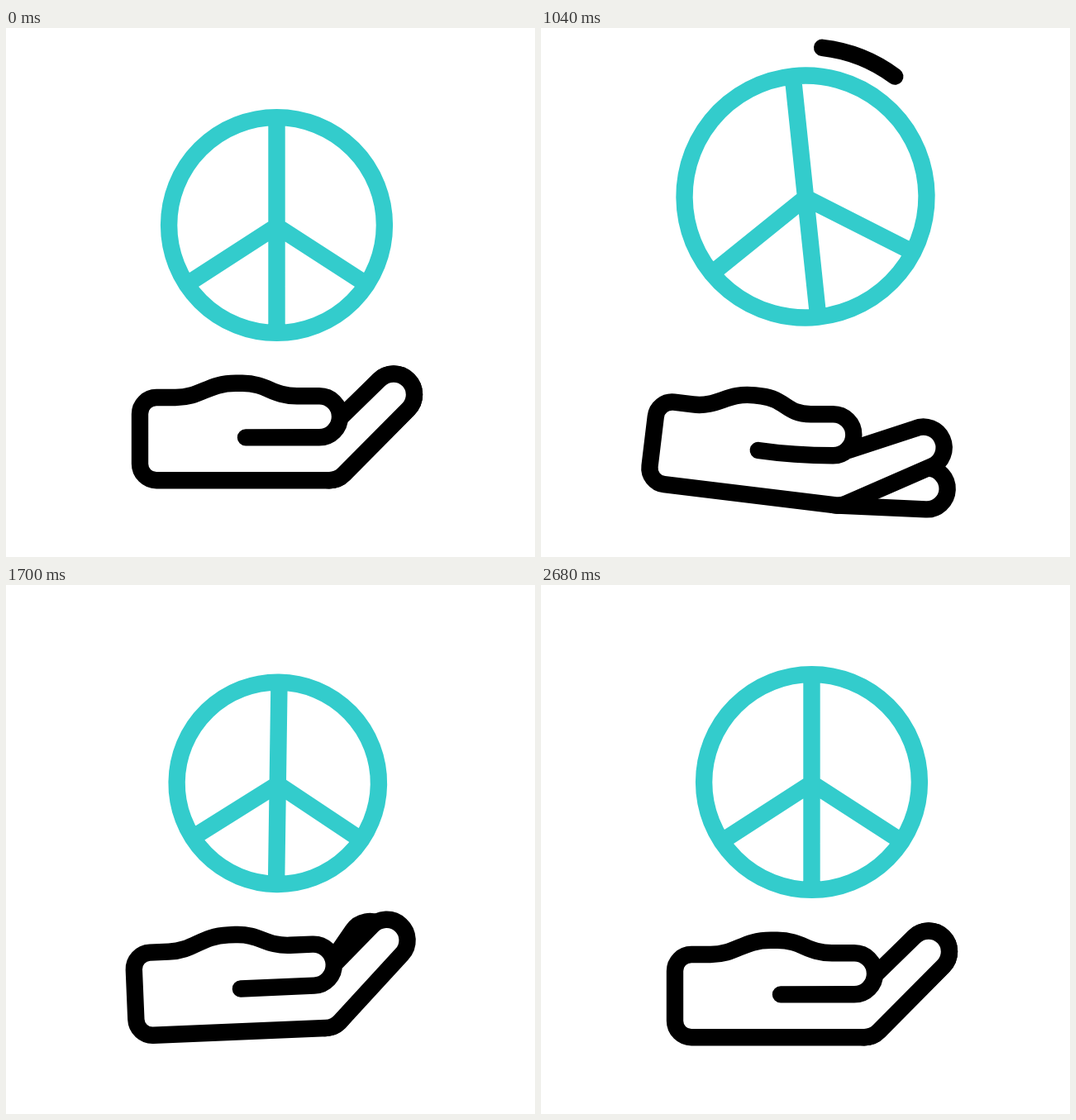
Animation, 640 px wide and 640 px high, one loop 2800 ms. Source, as an HTML page with a canvas:

```html
<!DOCTYPE html>
<html lang="en">
<head>
<meta charset="utf-8">
<title>Peace in hand</title>
<style>
html, body { margin: 0; width: 100%; height: 100%; overflow: hidden; background: #fff; }
canvas { display: block; }
</style>
</head>
<body>
<canvas id="stage" width="640" height="640"></canvas>
<script>
const ctx = document.getElementById('stage').getContext('2d');
const LOOP = 2800, LINE = 20.4, RAD = Math.PI / 180, QUARTER = Math.PI / 2;

const ramp = (t, from, to) => Math.min(1, Math.max(0, (t - from) / (to - from)));
const ease = (t, from, to) => {
  const u = ramp(t, from, to);
  return u * u * (3 - 2 * u);
};
// Swift rise to a level, then a slow drift to 1
const climb = (t, level) => level * ease(t, 60, 540) + (1 - level) * ramp(t, 540, 1040);

// Wrist: x, y, tilt. Fingertips: offset from the knuckle.
const wrist = { rest: [182, 547.2, 0], raised: [149, 552.2, 6.9], curled: [186, 542.7, -4.9],
  level: 0.94, curledAt: 1980, settledAt: 2510 };
const frontFinger = { rest: [78, -78.7], raised: [97, -57], curled: [78, -78],
  level: 0.94, curledAt: 1700, settledAt: 2680 };
const backFinger = { rest: [78, -78.7], raised: [107, -8], curled: [44, -95],
  level: 0.85, curledAt: 1980, settledAt: 2680 };

function poseAt(t, part) {
  const back = ease(t, 1040, part.curledAt);
  const raised = climb(t, part.level) * (1 - back);
  const curled = back - ease(t, part.curledAt, part.settledAt);
  return part.rest.map((value, i) =>
    value + raised * (part.raised[i] - value) + curled * (part.curled[i] - value));
}

function ballAt(t) {
  const fall = ease(t, 1080, 1440);
  const lift = level => climb(t, level) * (1 - fall);
  const squeeze = fall - ease(t, 1440, 2500);
  const puff = ease(t, 1980, 2250) - ease(t, 2250, 2520);
  const curl = ease(t, 1040, 1980) - ease(t, 1980, 2510);
  return {
    x: 327.5 - 7.5 * lift(0.76) + 1.5 * squeeze,
    y: 238.5 - 34.5 * lift(0.76) + 1.5 * squeeze,
    r: 130.4 + 16.1 * lift(0.85) - 9.7 * squeeze + 7 * puff,
    turn: -6 * lift(1) + 3 * squeeze - 2.2 * curl
  };
}

function rotate(x, y, angle) {
  const c = Math.cos(angle), s = Math.sin(angle);
  return [x * c - y * s, x * s + y * c];
}

function drawBall(t) {
  const { x, y, r, turn } = ballAt(t);
  const legX = r * Math.cos(33 * RAD), legY = r * Math.sin(33 * RAD) + 1;
  ctx.save();
  ctx.translate(x, y);
  ctx.rotate(turn * RAD);
  ctx.strokeStyle = '#33cccc';
  ctx.lineCap = 'butt';
  ctx.lineJoin = 'miter';
  ctx.beginPath();
  ctx.arc(0, 0, r, 0, 2 * Math.PI);
  ctx.moveTo(0, -r);
  ctx.lineTo(0, r);
  ctx.moveTo(-legX, legY);
  ctx.lineTo(0, 1.3);
  ctx.lineTo(legX, legY);
  ctx.stroke();
  ctx.restore();
}

function drawHand(t) {
  const [wristX, wristY, tilt] = poseAt(t, wrist);
  const rot = tilt * RAD, thumbRot = Math.min(0, rot);
  const hand = (x, y) => {
    const [dx, dy] = rotate(x - 182, y - 547.2, rot);
    return [wristX + dx, wristY + dy];
  };
  // The thumb stays level while the hand tips forward
  const thumb = (x, y) => {
    const [dx, dy] = rotate(x - 319, y - 478, thumbRot - rot);
    return hand(319 + dx, 478 + dy);
  };
  const finger = part => {
    const [dx, dy] = poseAt(t, part);
    return { tip: hand(391 + dx, 522.2 + dy), angle: Math.atan2(dy, dx) + rot };
  };
  const curve = (...pts) => ctx.bezierCurveTo(...pts.flat());
  const paint = () => { ctx.fill(); ctx.stroke(); };
  const knuckle = hand(391, 522.2);

  ctx.strokeStyle = '#000';
  ctx.fillStyle = '#fff';
  ctx.lineCap = ctx.lineJoin = 'round';

  const back = finger(backFinger);
  ctx.beginPath();
  ctx.arc(...back.tip, 25, back.angle + QUARTER, back.angle - QUARTER, true);
  ctx.arc(...knuckle, 25, back.angle - QUARTER, back.angle + QUARTER, true);
  ctx.closePath();
  paint();

  const front = finger(frontFinger);
  const palm = thumb(379, 470.3);
  const swell = 0.4 * Math.max(0, tilt), top = 429.8 - swell;
  const crease = 2 * (45 * RAD + front.angle);
  ctx.beginPath();
  ctx.moveTo(...hand(290, 495.4 - swell));
  ctx.quadraticCurveTo(...thumb(332, 495.3), ...thumb(379, 495.3));
  ctx.arc(...palm, 25, thumbRot + QUARTER, thumbRot - QUARTER, true);
  ctx.lineTo(...thumb(352, 445.3));
  curve(thumb(322, 445.3), hand(316, top), hand(286, top));
  ctx.lineTo(...hand(278, top));
  curve(hand(244, top), hand(236, 447), hand(205, 447));
  ctx.lineTo(...hand(182, 447));
  ctx.arcTo(...hand(162, 447), ...hand(162, 467), 20);
  ctx.lineTo(...hand(162, 527.2));
  ctx.arcTo(...hand(162, 547.2), ...hand(182, 547.2), 20);
  ctx.arc(...knuckle, 25, rot + QUARTER, front.angle + QUARTER, true);
  ctx.arc(...front.tip, 25, front.angle + QUARTER, front.angle - QUARTER, true);
  ctx.lineTo(palm[0] + 27 * Math.cos(crease), palm[1] + 27 * Math.sin(crease));
  paint();
}

// A stroke sweeps up beside the ball, then back down
function drawSweep(t) {
  const up = t < 900;
  const head = up ? ramp(t, 546, 731) : 1 - ramp(t, 964, 1204);
  const tail = up ? ramp(t, 680, 865) : 1 - ramp(t, 1040, 1280);
  if (head === tail) return;
  const { x, y } = ballAt(Math.min(t, 1080));
  const angle = u => (11.6 - 95.6 * u) * RAD;
  ctx.strokeStyle = '#000';
  ctx.lineCap = 'round';
  ctx.beginPath();
  ctx.arc(x, y, 181.3, angle(Math.min(head, tail)), angle(Math.max(head, tail)), true);
  ctx.stroke();
}

function draw(t) {
  ctx.fillStyle = '#fff';
  ctx.fillRect(0, 0, 640, 640);
  ctx.lineWidth = LINE;
  drawBall(t);
  drawHand(t);
  drawSweep(t);
}

const start = performance.now();
function frame() {
  draw((performance.now() - start) % LOOP);
  requestAnimationFrame(frame);
}
frame();
</script>
</body>
</html>
```
